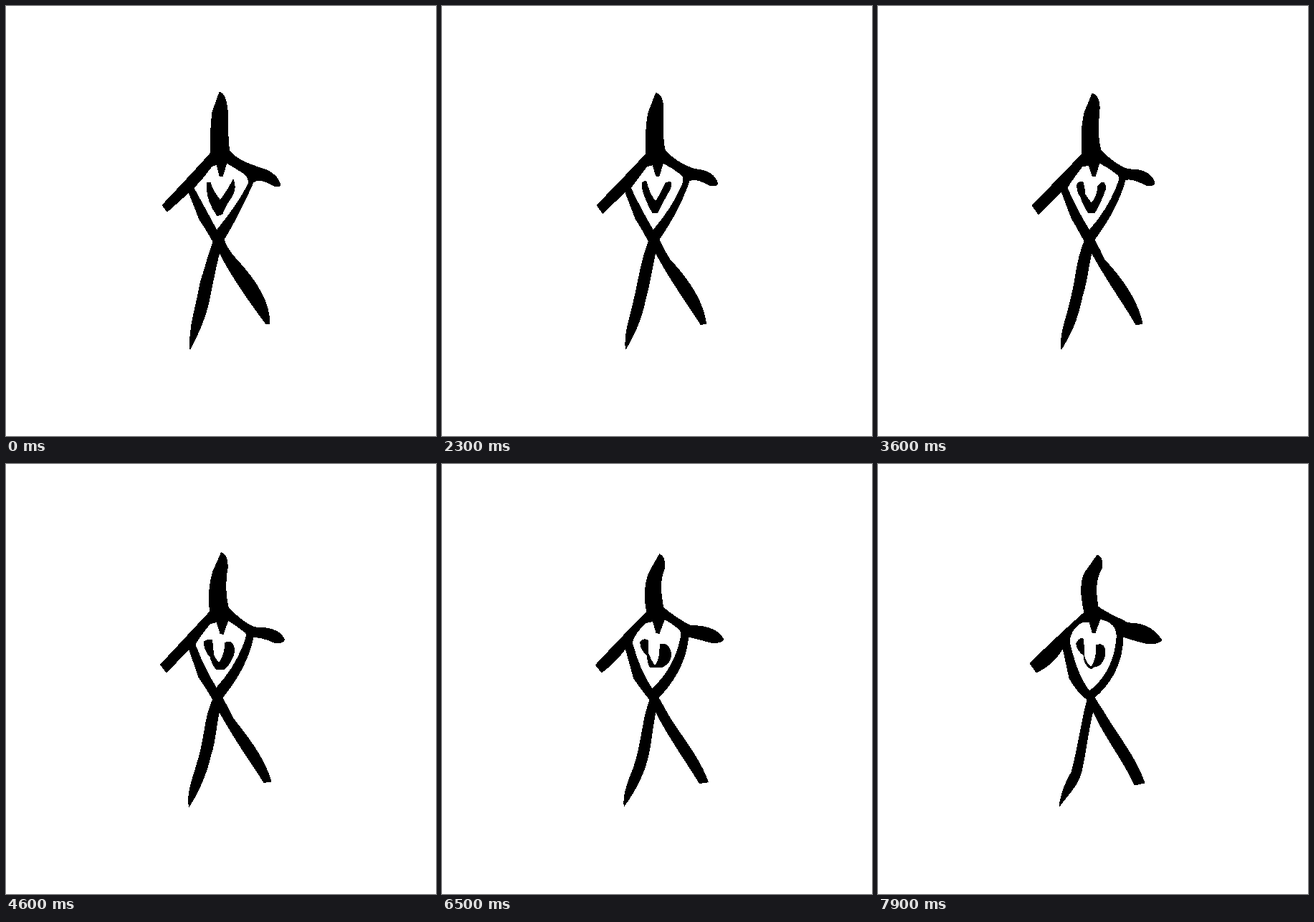
These frames come from a looping animation (600 px wide and 600 px high, 8 s). An HTML page:

```html
<!DOCTYPE html>
<html lang="en">
<head>
<meta charset="utf-8">
<title>Figure</title>
<style>
  html, body { margin: 0; width: 100%; height: 100%; overflow: hidden; background: #fff; }
  svg { display: block; width: 100vw; height: 100vh; }
  path { stroke: #000; stroke-width: 1; stroke-linejoin: round; }
</style>
</head>
<body>
<svg viewBox="0 0 600 600" shape-rendering="crispEdges">
  <path id="body"/>
  <path id="hole" fill="#fff"/>
  <path id="heart"/>
</svg>
<script>
const LOOP = 8000, STEP = 100;

// Each part: time in ms -> outline. All outlines of a part share their commands.
const poses = {
  body: {
    0: `M298 120 Q307 123 309 145 C310 165 309 190 312 202 C322 215 340 221 358 227
      Q378 233 383 250 Q379 254 372 250 Q353 239 345 246 Q327 288 304 326
      Q309 340 321 353 C340 373 368 408 368 443 L363 444 C349 425 315 380 298 344
      C292 365 288 390 283 413 C277 440 266 462 257 479 C255 455 262 430 265 416
      C269 400 271 382 275 374 Q281 352 289 329 Q281 314 270 298 L255 260
      Q240 274 225 287 L218 278 Q253 241 285 206 Q285 170 288 148 Z`,
    3600: `M299 122 Q310 126 309 145 C307 165 307 188 311 201 C323 214 337 224 349 228
      Q380 227 386 247 Q384 252 374 250 Q353 239 345 243 Q334 283 302 326
      Q310 341 316 354 C332 371 361 405 369 443 L360 445 C345 418 320 385 298 344
      C292 372 291 388 285 405 C277 445 266 462 256 479 C253 457 264 433 267 417
      C271 402 274 388 276 374 Q280 348 288 328 Q279 311 270 296 L256 259
      Q240 274 224 291 L215 278 Q253 240 285 206 Q282 175 288 149 Z`,
    5600: `M302 125 Q311 130 309 147 C303 164 307 188 310 201 C321 211 337 224 345 228
      Q384 228 391 244 Q388 250 374 248 Q356 242 345 241 Q338 286 302 326
      Q310 341 316 353 C328 374 358 407 371 443 L360 444 C341 418 318 385 297 346
      C292 372 293 388 288 402 C279 435 266 462 255 477 C250 460 262 432 266 419
      C275 395 276 378 279 364 Q281 348 289 329 Q281 316 268 299 L255 258
      Q240 274 224 291 L216 282 Q253 240 284 206 Q280 175 290 150 Z`,
    7900: `M306 127 Q315 131 312 146 C301 166 305 184 307 199 C318 208 335 214 349 222
      Q380 221 396 246 Q388 253 373 250 Q356 246 342 241 Q341 292 302 326
      Q310 338 318 351 C334 378 360 410 372 445 L358 448 C343 413 318 385 300 345
      C293 372 290 402 285 424 C281 448 264 462 253 478 C255 458 265 438 270 430
      C277 405 281 378 284 365 Q287 348 292 329 Q277 317 267 299 L258 257
      Q245 280 221 291 L212 278 Q253 238 288 207 Q279 169 289 151 Z`
  },
  hole: {
    0: `M262 254 Q275 240 287 224 L294 221 L298 237 L302 238 L308 219 Q320 226 331 233
      Q340 240 338 248 Q325 275 294 313 Q279 285 262 254 Z`,
    3600: `M264 254 Q268 246 285 224 L294 222 L299 237 L303 238 L309 219 Q323 226 335 236
      Q337 239 336 244 Q324 280 295 313 Q279 288 264 254 Z`,
    5600: `M264 250 Q268 241 284 222 L294 219 L299 236 L303 237 L311 217 Q324 227 334 235
      Q335 238 333 243 Q321 282 292 312 Q275 285 264 250 Z`,
    7900: `M267 247 Q270 228 285 221 L295 220 L299 235 L303 236 L310 216 Q327 220 331 230
      Q334 236 333 243 Q329 291 295 317 Q277 294 267 247 Z`
  },
  heart: {
    0: `M280 247 Q283 246 285 246 Q287 253 291 260 Q295 266 299 271 Q309 258 317 242
      Q322 254 315 266 Q303 284 302 290 L295 293 Q288 283 284 273 Q280 262 280 247 Z`,
    2300: `M279 247 Q281 244 285 245 Q287 253 291 262 Q294 268 298 273 Q304 264 312 247
      Q324 242 318 256 Q307 275 301 288 L294 289 Q288 279 284 268 Q279 258 279 247 Z`,
    3600: `M278 249 Q281 244 286 246 Q288 252 289 263 Q293 270 298 275 Q306 266 307 251
      Q316 240 318 254 Q311 274 302 289 L293 288 Q286 277 283 267 Q277 258 278 249 Z`,
    5600: `M275 247 Q281 244 289 246 Q289 256 290 268 Q293 279 297 280 Q304 268 305 248
      Q317 247 320 268 Q319 282 306 285 L293 284 Q288 279 287 271 Q275 261 275 247 Z`,
    6500: `M277 248 Q281 243 287 246 Q288 254 288 265 Q291 273 297 282 Q305 273 304 252
      Q317 248 320 266 Q318 280 305 284 L290 283 Q286 276 287 268 Q276 258 277 248 Z`,
    7900: `M277 250 Q282 241 286 244 Q288 254 287 266 Q291 281 298 283 Q306 271 304 253
      Q317 248 317 264 Q314 282 302 283 L297 286 Q287 280 287 267 Q276 258 277 250 Z`
  }
};

function blend(from, to, k) {
  const ends = to.match(/\d+/g);
  let i = 0;
  return from.replace(/\d+/g, n => (+n + (ends[i++] - n) * k).toFixed(2));
}

function outline(table, t) {
  const times = Object.keys(table).map(Number);
  const next = Math.max(1, times.findIndex(s => s >= t));
  const [a, b] = [times[next - 1], times[next]];
  return blend(table[a], table[b], (t - a) / (b - a));
}

const start = performance.now();

function draw() {
  const now = Math.max(0, performance.now() - start) % LOOP;
  const t = Math.floor(now / STEP) * STEP;
  for (const id in poses) {
    document.getElementById(id).setAttribute('d', outline(poses[id], t));
  }
  requestAnimationFrame(draw);
}
draw();
</script>
</body>
</html>
```
